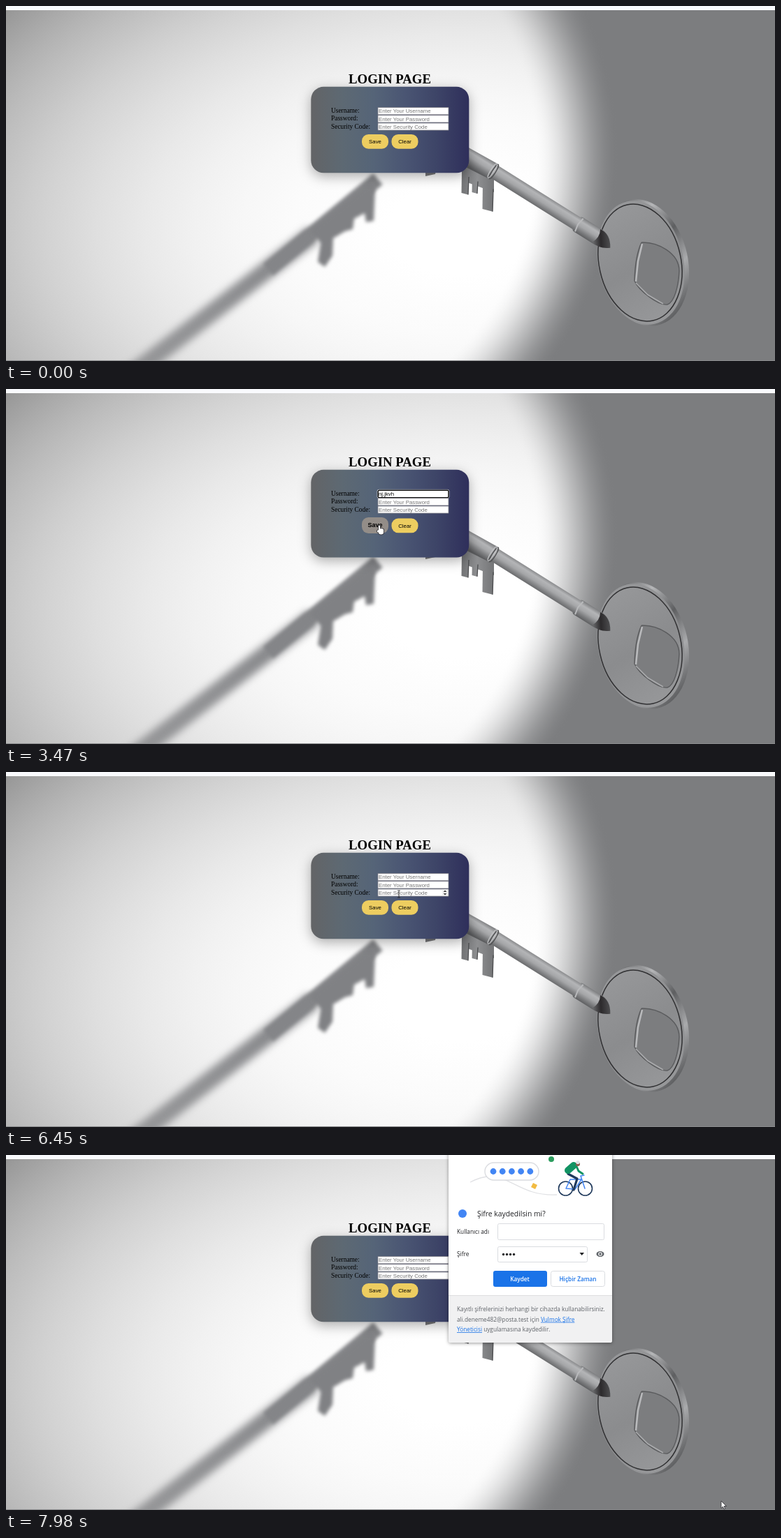
An HTML page with a canvas for the animation above (8000 ms loop, 1100x509 px).

```html
<!DOCTYPE html>
<html lang="en">
<head>
<meta charset="utf-8">
<title>Login page</title>
<style>
html, body { margin: 0; width: 100%; height: 100%; overflow: hidden; background: #fff; }
canvas { display: block; width: 1100px; height: 509px; }
</style>
</head>
<body>
<canvas id="stage" width="1100" height="509"></canvas>
<script>
const W = 1100, H = 509, LOOP = 8000, PAD = 20;
const SANS = '"Liberation Sans", Arial, sans-serif';
const SERIF = '"Liberation Serif", "Times New Roman", serif';
const UI = '"Open Sans", "Noto Sans", sans-serif';
const DARK = '#7c7d7f';
const stage = document.getElementById('stage').getContext('2d');

// ---- helpers ----
const clamp = v => Math.max(0, Math.min(1, v));
const smooth = v => v * v * (3 - 2 * v);
const mix = (a, b, k) => a + (b - a) * k;

function layer(draw, pad = 0) {
  const c = document.createElement('canvas');
  c.width = W;
  c.height = H + pad * 2;
  const g = c.getContext('2d');
  g.translate(0, pad);
  draw(g);
  return c;
}

// Evenly spaced colours.
function ramp(gradient, ...colors) {
  colors.forEach((c, i) => gradient.addColorStop(i / (colors.length - 1), c));
  return gradient;
}

// Gradient colour as a function of the position 0..1.
function curve(gradient, color, steps = 24) {
  return ramp(gradient, ...Array.from({ length: steps + 1 }, (_, i) => color(i / steps)));
}

function paint(g, fill, stroke, width = 1) {
  if (fill) { g.fillStyle = fill; g.fill(); }
  if (stroke) { g.strokeStyle = stroke; g.lineWidth = width; g.stroke(); }
}

function poly(g, pts, fill) {
  g.beginPath();
  for (let i = 0; i < pts.length; i += 2) g.lineTo(pts[i], pts[i + 1]);
  g.closePath();
  paint(g, fill);
}

function line(g, pts, color, width) {
  g.beginPath();
  for (let i = 0; i < pts.length; i += 2) g.lineTo(pts[i], pts[i + 1]);
  paint(g, null, color, width);
}

function oval(g, x, y, rx, ry, fill, stroke, width, tilt = 0) {
  g.beginPath();
  g.ellipse(x, y, rx, ry, tilt, 0, Math.PI * 2);
  paint(g, fill, stroke, width);
}

const dot = (g, x, y, r, fill) => oval(g, x, y, r, r, fill);

function box(g, x, y, w, h, r, fill, stroke, width) {
  g.beginPath();
  g.roundRect(x, y, w, h, r);
  paint(g, fill, stroke, width);
}

function text(g, str, x, y, font, color, align = 'left') {
  g.font = font;
  g.fillStyle = color;
  g.textAlign = align;
  g.fillText(str, x, y);
  return g.measureText(str).width;
}

// ---- backdrop: spotlight, key and its shadow ----
function drawLight(g) {
  // lit wall, fading with distance from the bright spot
  g.save();
  g.translate(650, 320);
  g.scale(1.6, 1);
  g.fillStyle = curve(g.createRadialGradient(0, 0, 0, 0, 0, 520), k => {
    const v = 255 - 108 * k ** 2.6;
    return `rgb(${v},${v},${v})`;
  });
  g.fillRect(-650, -320, W, H);
  g.restore();
  // unlit wall beyond the round edge on the right
  g.fillStyle = curve(g.createRadialGradient(358, 215, 398, 358, 215, 518),
    k => `rgba(124,125,127,${smooth(k)})`);
  g.fillRect(358, 0, W, H);
}

function drawShadow(g) {
  g.save();
  g.filter = 'blur(6px)';
  const fade = ramp(g.createLinearGradient(200, 510, 440, 325), 'rgba(110,111,114,.65)', '#838487');
  line(g, [175, 532, 440, 327], fade, 25);
  g.filter = 'blur(2.5px)';
  line(g, [375, 378, 532, 248], '#848588', 21);
  poly(g, [436, 322, 520, 255, 528, 262, 526, 308, 515, 310, 513, 297, 498, 305,
    496, 320, 485, 323, 468, 333, 467, 358, 456, 374, 446, 367, 450, 340], '#808184');
  g.restore();
}

function drawBit(g) {
  const slope = x => 236 + (x - 652) * 0.5;
  const steel = ramp(g.createLinearGradient(652, 0, 697, 0), '#737476', '#8e8f91', '#757678');
  poly(g, [652, 225, 698, 245, 698, slope(698) + 8, 652, slope(652) + 14], steel);
  for (const [x, w, end] of [[652, 10, 268], [667, 8, 267], [682, 15, 291]]) {
    poly(g, [x, slope(x), x + w, slope(x + w), x + w - 1, end + w / 4, x - 0.5, end], steel);
    line(g, [x + w, slope(x + w) + 4, x + w - 1, end + w / 4], '#4c4d4f', 1.3);
  }
  poly(g, [600, 236, 615, 236, 614, 241, 600, 244], '#777779');
}

function drawShaft(g) {
  g.save();
  g.translate(697, 237);
  g.rotate(0.56);
  const metal = ramp(g.createLinearGradient(0, -12, 0, 13), '#7c7d7f', '#b4b5b7', '#a5a6a8', '#7d7e80', '#595a5c');
  poly(g, [-70, -9, 0, -12.5, 0, 12.5, -70, 19], metal);
  box(g, 0, -10.5, 145, 20.5, 0, metal);
  oval(g, 1, 0, 2.5, 12, null, '#505153', 1.4);
  oval(g, -1.5, 0, 2.5, 12, null, '#c3c4c6', 1);
  box(g, 140, -12, 50, 24, [4, 12, 12, 4], metal);
  line(g, [145, -11, 143, 0, 145, 11], '#b9babc', 2);
  g.beginPath();
  g.moveTo(174, -11);
  g.quadraticCurveTo(190, -13, 200, 4);
  g.quadraticCurveTo(188, 14, 174, 11);
  g.quadraticCurveTo(180, 0, 174, -11);
  paint(g, ramp(g.createLinearGradient(172, 8, 192, -6), '#6d6e70', '#2c2a2c', '#4a4a4c'));
  g.restore();
}

function drawBow(g) {
  const tilt = -0.22;
  const rim = ramp(g.createLinearGradient(850, 300, 978, 420), '#58595b', '#b5b6b8', '#5e5f61', '#a9aaac', '#606163');
  oval(g, 912, 368, 63.5, 92, rim, null, 0, tilt);
  const face = ramp(g.createLinearGradient(860, 290, 960, 450), '#97989a', '#8b8c8e', '#98999b');
  oval(g, 908, 368, 61, 90, face, null, 0, tilt);
  oval(g, 907, 368, 58.5, 85, null, '#303032', 1.5, tilt);

  g.beginPath();
  g.moveTo(909, 339);
  g.bezierCurveTo(932, 338, 963, 354, 963, 380);
  g.bezierCurveTo(962, 402, 956, 425, 946, 428);
  g.bezierCurveTo(933, 430, 905, 408, 899, 394);
  g.quadraticCurveTo(900, 358, 909, 339);
  paint(g, DARK, '#5a5b5d', 1.4);
  line(g, [910, 341, 904, 366, 901, 395], '#b9babc', 2.5);
  line(g, [901, 397, 918, 414, 940, 427], '#a9aaac', 1.6);
}

const backdrop = layer(g => {
  drawLight(g);
  drawShadow(g);
  drawBit(g);
  drawBow(g);
  drawShaft(g);
  g.fillStyle = '#f9fafd';
  g.fillRect(0, 0, W, 6);
  g.fillStyle = '#88898b';
  g.fillRect(0, 508, W, 1);
});

// ---- save-password bubble ----
function drawCyclist(g) {
  const navy = '#203a5c', blue = '#4285f4', green = '#129363';
  g.save();
  g.lineCap = g.lineJoin = 'round';
  for (const x of [800.5, 828.5]) oval(g, x, 48, 10, 10, null, navy, 1.6);
  line(g, [801, 48, 807, 35, 823, 35, 814, 49, 801, 48], blue, 1.5);
  line(g, [828, 48, 822, 30, 827, 29], blue, 1.5);
  line(g, [804, 27, 817, 34, 812, 50], navy, 3.2);
  line(g, [804, 22, 812, 15], green, 10);
  line(g, [815, 14, 819, 23, 825, 27], green, 3);
  dot(g, 818, 13, 3, '#8d5b4c');
  dot(g, 818, 10.5, 2.6, '#dfe3e8');
  g.restore();
}

const bubble = layer(g => {
  const grey = '#5f6368', blue = '#1a73e8', edge = '#dadce0', ink = '#202124';
  const small = `8.27px ${UI}`, strong = `600 8.25px ${UI}`;
  g.save();
  g.shadowColor = 'rgba(0,0,0,.4)';
  g.shadowBlur = 5;
  g.shadowOffsetY = 1;
  box(g, 633, -17, 234, 286, 3, '#fff');
  g.restore();
  box(g, 633, 201, 234, 68, [0, 0, 3, 3], '#f1f1f2');
  line(g, [633, 201.5, 867, 201.5], '#dddddf', 1);

  // picture
  g.beginPath();
  g.moveTo(664, 39);
  g.bezierCurveTo(715, 12, 725, 60, 788, 57);
  paint(g, null, '#e0e1e4', 1.3);
  box(g, 685, 11, 77, 25, 12.5, '#fff', edge, 1.4);
  for (let i = 0; i < 5; i++) dot(g, 697 + i * 13.2, 23.5, 4.4, '#4285f4');
  poly(g, [754, 40, 760, 43, 757, 49, 751, 46], '#f2bb42');
  dot(g, 780, 6, 4, '#2d9d5f');
  box(g, 707, -6, 8, 5, 1, '#8d6a5f');
  drawCyclist(g);

  // form
  dot(g, 653, 84, 6, '#4285f4');
  text(g, 'Şifre kaydedilsin mi?', 674, 88, `10.35px ${UI}`, ink);
  text(g, 'Kullanıcı adı', 645, 113, small, ink);
  text(g, 'Şifre', 645, 145, small, ink);
  box(g, 703.5, 98.5, 152, 23, 2, '#fff', edge);
  box(g, 703.5, 131.5, 128, 22, 2, '#fff', edge);
  for (let i = 0; i < 4; i++) dot(g, 711.5 + i * 5, 142.5, 1.7, ink);
  poly(g, [820.5, 140, 827, 140, 823.7, 144], ink);
  oval(g, 850, 142, 5.5, 4, grey);
  dot(g, 850, 142, 2.8, '#fff');
  dot(g, 850, 142, 1.7, grey);
  box(g, 697, 166, 77, 23, 3, blue);
  text(g, 'Kaydet', 735, 180.5, strong, '#fff', 'center');
  box(g, 779.5, 166.5, 77, 22, 3, '#fff', edge);
  text(g, 'Hiçbir Zaman', 818, 180.5, strong, blue, 'center');

  // footer
  const link = (str, x, y) => {
    const w = text(g, str, x, y, small, blue);
    line(g, [x, y + 1.5, x + w, y + 1.5], blue, 0.8);
    return w;
  };
  text(g, 'Kayıtlı şifrelerinizi herhangi bir cihazda kullanabilirsiniz.', 645, 223.5, small, grey);
  const lead = text(g, 'ali.deneme482@posta.test için ', 645, 238.5, small, grey);
  link('Vulmok Şifre', 645 + lead, 238.5);
  const tail = link('Yöneticisi', 645, 253);
  text(g, ' uygulamasına kaydedilir.', 645 + tail, 253, small, grey);
}, PAD);

function drawBubble(g, t) {
  const p = clamp((t - 7710) / 200);
  const s = mix(0.947, 1, p);
  g.save();
  g.globalAlpha = p;
  g.translate(750, 126);
  g.scale(s, s);
  g.drawImage(bubble, -750, -126 - PAD);
  g.restore();
}

// ---- login form ----
const FIELDS = [
  { label: 'Username:', hint: 'Enter Your Username', typed: 'nj.jkvh', focus: [1900, 3530], start: 2410, step: 60 },
  { label: 'Password:', hint: 'Enter Your Password', typed: '••••', focus: [4410, 6000], start: 4610, step: 103 },
  { label: 'Security Code:', hint: 'Enter Security Code', typed: '', focus: [6520, 7250], start: 6520, step: 0, spinner: true }
];
FIELDS.forEach((f, i) => { f.y = 145 + i * 11.2; });
const BUTTONS = [{ label: 'Save', x: 509 }, { label: 'Clear', x: 551.5 }];

// pointer moves: begin, end, and the place reached
const MOVES = [
  [250, 1000, 531, 196], [1400, 1550, 550, 181], [1790, 1950, 560, 148], [2840, 3210, 534, 195.5],
  [3680, 4400, 549, 162], [4850, 5360, 564, 197], [6270, 6450, 562, 175], [6700, 7050, 534, 196],
  [7230, 7790, 697, 323], [7790, 7970, 1023, 496]
];

function pointerAt(t) {
  if (t < MOVES[0][0]) return null;
  let x = 1050, y = 497;
  for (const [begin, end, toX, toY] of MOVES) {
    const k = clamp((t - begin) / (end - begin));
    x = mix(x, toX, k);
    y = mix(y, toY, k);
  }
  return { x, y };
}

const within = (p, x, y, w, h) => !!p && p.x >= x && p.x < x + w && p.y >= y && p.y < y + h;

function drawField(g, f, t, over) {
  const focused = t >= f.focus[0] && t < f.focus[1];
  const length = f.typed.length;
  const count = focused && t >= f.start ? Math.min(length, Math.floor((t - f.start) / f.step) + 1) : 0;
  const value = f.typed.slice(0, count || 0);
  text(g, f.label, 465, f.y + 8.2, `9.38px ${SERIF}`, '#000');
  box(g, 532, f.y + 0.5, 101, 10.2, 0, '#fff', '#85838b', 0.8);
  if (focused) {
    box(g, 531.2, f.y - 0.6, 102.6, 12, 2, null, '#fff', 0.8);
    box(g, 532.2, f.y + 0.3, 100.8, 10.4, 1.5, '#fff', '#101010', 1.5);
  }
  const w = text(g, value || f.hint, 533, f.y + 8.3, `7.81px ${SANS}`, value ? '#000' : '#757575');
  // the caret rests while typing, then blinks
  const idle = t - f.start - Math.max(0, length - 1) * f.step;
  if (focused && (idle < 0 || idle % 1000 < 500)) {
    const x = 533.4 + (value ? w : 0);
    line(g, [x, f.y + 1.8, x, f.y + 9.6], '#000', 0.7);
  }
  if (over && f.spinner) {
    const mid = f.y + 5.6;
    box(g, 624, mid - 4.4, 8, 8.8, 0, '#efefef');
    for (const s of [-1, 1]) poly(g, [625.6, mid + s, 628, mid + s * 3.6, 630.4, mid + s], '#404040');
  }
}

function drawForm(g, t, overField, overButton) {
  const grown = overButton ? 2.3 : 0;
  g.save();
  g.shadowColor = 'rgba(0,0,0,.32)';
  g.shadowBlur = 18;
  g.shadowOffsetY = 5;
  const fill = ramp(g.createLinearGradient(436, 0, 662, 0), '#636466', '#5d6973', '#556478', '#4a5573', '#3d4467', '#2f2f5b');
  box(g, 436.3, 115.8, 226, 123.5 + grown, 18, fill);
  g.restore();
  text(g, 'LOGIN PAGE', 549, 111, `bold 18.75px ${SERIF}`, '#000', 'center');
  for (const f of FIELDS) drawField(g, f, t, f === overField);
  for (const b of BUTTONS) {
    const hot = b === overButton;
    const y = 184 + (overButton && !hot ? 1.6 : 0);
    const h = hot ? 23 : 20.7;
    box(g, b.x, y, 38, h, 9.5, hot ? '#938d88' : '#edcd60');
    const font = hot ? `bold 9px ${SANS}` : `7.81px ${SANS}`;
    text(g, b.label, b.x + 19, y + h / 2 + 2.9, font, '#000', 'center');
  }
}

// ---- pointers ----
const OUTLINE = '#26262c';

function drawArrow(g) {
  poly(g, [0, 0, 0, 10.4, 2.4, 8.2, 4, 11.9, 5.6, 11.2, 4.1, 7.6, 7.4, 7.5], '#fff');
  paint(g, null, OUTLINE, 0.8);
}

function drawHand(g) {
  g.beginPath();
  g.roundRect(-1.1, 0, 2.2, 9, 1.1);
  g.roundRect(-1.1, 4.8, 7.2, 8.2, [1, 2, 3, 3]);
  g.roundRect(-3.2, 6.8, 4, 3.2, 1.5);
  paint(g, null, OUTLINE, 1.5);
  paint(g, '#fff');
}

function drawBeam(g) {
  line(g, [0, -4.6, 0, 4.6], '#222', 0.9);
  for (const y of [-5, 5]) line(g, [-2, y, 2, y], '#222', 0.8);
}

// ---- playback ----
function render(t) {
  const g = stage;
  const p = pointerAt(t);
  const overField = FIELDS.find(f => within(p, 532, f.y, 101, 11.2));
  const overButton = BUTTONS.find(b => within(p, b.x, 184, 38, 22));
  g.drawImage(backdrop, 0, 0);
  drawForm(g, t, overField, overButton);
  drawBubble(g, t);
  if (!p) return;
  g.save();
  g.translate(p.x, p.y);
  (overButton ? drawHand : overField ? drawBeam : drawArrow)(g);
  g.restore();
}

const began = performance.now();
function tick() {
  render((performance.now() - began) % LOOP);
  requestAnimationFrame(tick);
}
tick();
</script>
</body>
</html>
```
